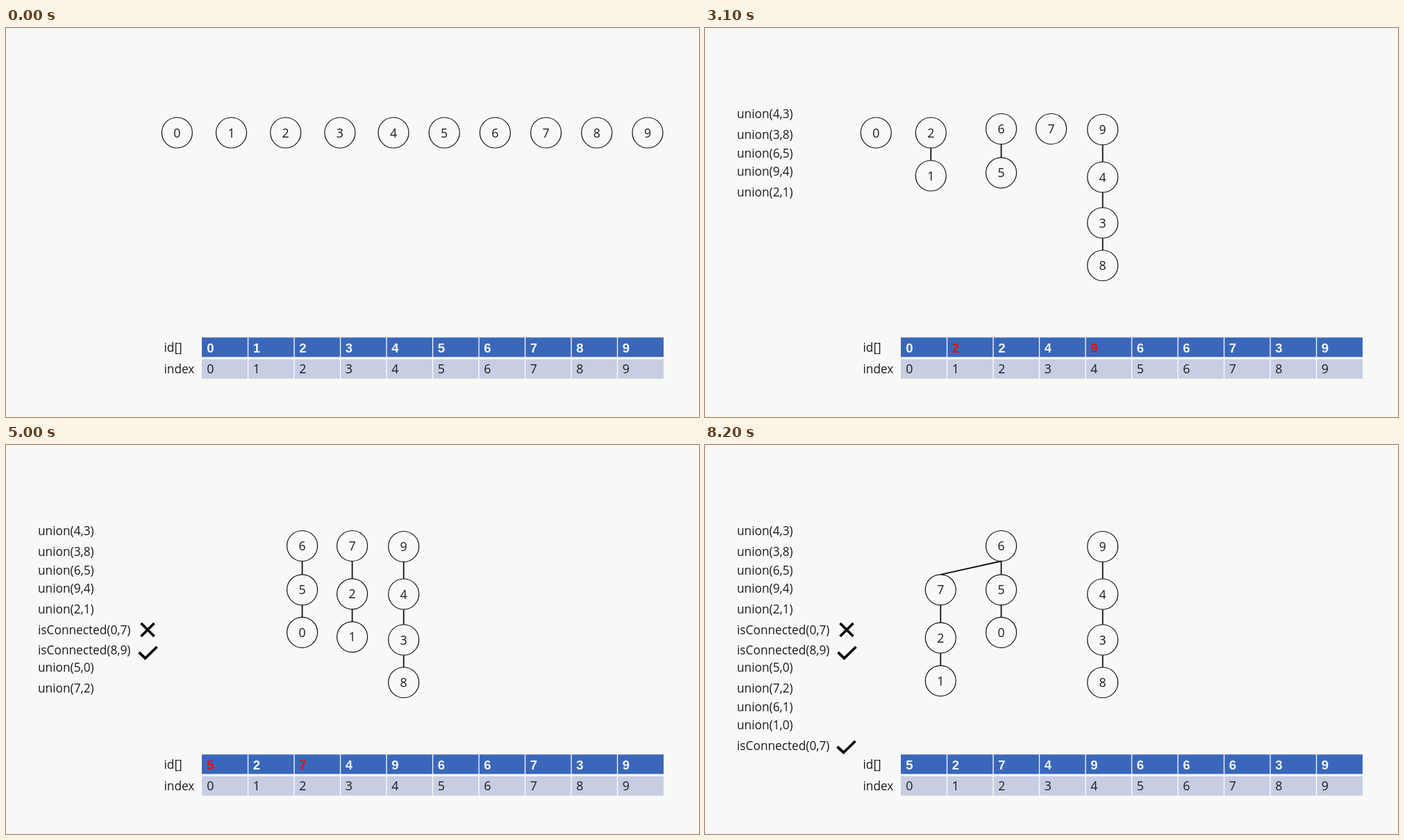
Animation of 998x561 px, one loop 8.6 s. Source, as an HTML page:

```html
<!DOCTYPE html>
<html lang="en">
<head>
<meta charset="utf-8">
<title>Quick union</title>
<style>
html, body { margin: 0; width: 100%; height: 100%; overflow: hidden; background: #f8f8f6; }
svg { display: block; width: 998px; height: 561px; }
text { font: 17.25px "Open Sans", "Noto Sans", sans-serif; fill: #1c1c1c; }
.num { font-size: 17.8px; }
.mid { text-anchor: middle; }
.id { font: bold 18.5px "Liberation Sans", Arial, sans-serif; fill: #f4f6fb; }
.new { fill: #e60f14; }
.node { fill: none; stroke: #111; stroke-width: 1.2; }
.link { stroke: #111; stroke-width: 1.8; }
.mark { fill: none; stroke: #0a0a0a; stroke-width: 3.8; }
.lit { fill: #f4c3a6; }
</style>
</head>
<body>
<svg id="stage" viewBox="0 0 998 561">
  <g id="table"></g>
  <g id="scene"></g>
</svg>
<script>
const LOOP = 8600, R = 22, COL = 66.5, LEFT = 282, WIDTH = 10 * COL, SIBLING = -87.3;
const digits = [...Array(10).keys()];

// Each step runs its commands; a union also names the length of its new link.
// "roots" gives the new places of trees that move.
const script = [
  { at: 1100, run: [["union(4,3)", 66], ["union(3,8)", 61.5], ["union(6,5)", 63.3]],
    roots: { 4: [477.2, 146], 6: [561.8, 146], 7: [634, 146], 9: [715, 146.5] } },
  { at: 2400, run: [["union(9,4)", 68.5], ["union(2,1)", 62]],
    roots: { 2: [325.3, 151], 6: [426.6, 145.5], 7: [498.6, 145.5], 9: [572.7, 146.5] } },
  { at: 3600, run: [["isConnected(0,7)"], ["isConnected(8,9)"]] },
  { at: 4800, run: [["union(5,0)", 61.5]] },
  { at: 5000, run: [["union(7,2)", 69.3]] },
  { at: 6100, run: [["union(6,1)", 63.3]] },
  { at: 6200, run: [["union(1,0)"]] },
  { at: 7400, run: [["isConnected(0,7)"]] }
];

// Nodes light up for a moment, then the answer is marked.
const queries = [
  { at: 3800, nodes: [0, 7], steps: 3, x: 194.5, y: 257, yes: false },
  { at: 4300, nodes: [8, 9], steps: 3, x: 191.5, y: 291, yes: true },
  { at: 8000, nodes: [0, 7, 6], steps: 2, x: 190.5, y: 427, yes: true }
];

const lineGaps = [0, 30, 57, 83, 113, 143, 172];
const lineY = i => 124 + 197 * Math.floor(i / 7) + lineGaps[i % 7];

const rowX = i => i < 4 ? 246.3 + 78.2 * i : 558 + 73.2 * (i - 4);

const rootOf = (ids, n) => ids[n] === n ? n : rootOf(ids, ids[n]);

function union(state, p, q, gap) {
  const { ids, links } = state, child = rootOf(ids, q);
  if (child === rootOf(ids, p)) return;
  const dx = ids.some((parent, n) => parent === p && n !== p) ? SIBLING : 0;
  ids[child] = p;
  links[child] = [dx, gap];
  state.fresh.push(child);
}

function buildStates() {
  const states = [{
    at: 0, ids: digits, links: {}, fresh: [], lines: [],
    roots: digits.map(i => [rowX(i), 151])
  }];
  for (const { at, run, roots } of script) {
    const last = states[states.length - 1];
    const state = {
      at, ids: [...last.ids], links: { ...last.links }, roots: { ...last.roots, ...roots },
      lines: [...last.lines, ...run.map(r => r[0])],
      fresh: at - last.at <= 200 ? [...last.fresh] : []
    };
    for (const [text, gap] of run)
      if (text.startsWith("union")) union(state, ...text.match(/\d/g).map(Number), gap);
    states.push(state);
  }
  return states;
}
const states = buildStates();

function place(state, n) {
  const parent = state.ids[n];
  if (parent === n) return state.roots[n];
  const [x, y] = place(state, parent), [dx, dy] = state.links[n];
  return [x + dx, y + dy];
}

const label = (s, x, y, cls = "") => `<text x="${x}" y="${y + 6.2}" class="${cls}">${s}</text>`;
const cellX = i => LEFT + 7.3 + i * COL;

function drawTable() {
  const band = (y, h, fill) => `<rect x="${LEFT}" y="${y}" width="${WIDTH}" height="${h}" fill="${fill}"/>`;
  let out = label("id[]", 227.5, 461) + label("index", 227.5, 491.5)
    + band(446, 60, "#fdfdfd") + band(446.3, 28.2, "#3a67ba") + band(477.7, 28, "#c7cde2");
  for (const i of digits) {
    if (i) out += `<rect x="${LEFT + i * COL - .6}" y="446" width="1.3" height="60" fill="#fdfdfd"/>`;
    out += label(i, cellX(i), 492, "num");
  }
  return out;
}

function drawQuery({ at, nodes, steps, x, y, yes }, t, pos) {
  const step = Math.floor((t - at) / 100);
  if (step < 0) return "";
  if (step >= steps)
    return `<path class="mark" d="M${x} ${y}${yes ? "m0 8l9 8.5l17 -16.5" : "l19 19m0 -19l-19 19"}"/>`;
  const level = step === 1 ? .8 : .4;
  return nodes.map(n =>
    `<circle class="lit" cx="${pos[n][0]}" cy="${pos[n][1]}" r="${R - .6}" opacity="${level}"/>`).join("");
}

function drawScene(t) {
  const state = states.filter(s => s.at <= t).pop();
  const { ids, fresh, lines } = state;
  const pos = digits.map(n => place(state, n));
  let out = "";
  for (const n of digits) {
    const [x, y] = pos[n], [px, py] = pos[ids[n]];
    out += `<circle class="node" cx="${x}" cy="${y}" r="${R}"/>` + label(n, x, y + .4, "num mid");
    if (ids[n] !== n)
      out += `<line class="link" x1="${px}" y1="${py + R}" x2="${x}" y2="${y - R}"/>`;
    out += label(ids[n], cellX(n), 461.5, fresh.includes(n) ? "id new" : "id");
  }
  lines.forEach((s, i) => out += label(s, 46, lineY(i)));
  for (const q of queries) out += drawQuery(q, t, pos);
  return out;
}

const scene = document.getElementById("scene");
document.getElementById("table").innerHTML = drawTable();

let shown = -1;
function update() {
  const t = Math.floor(performance.now() % LOOP / 100) * 100;
  if (t !== shown) scene.innerHTML = drawScene(shown = t);
  requestAnimationFrame(update);
}
update();
</script>
</body>
</html>
```
